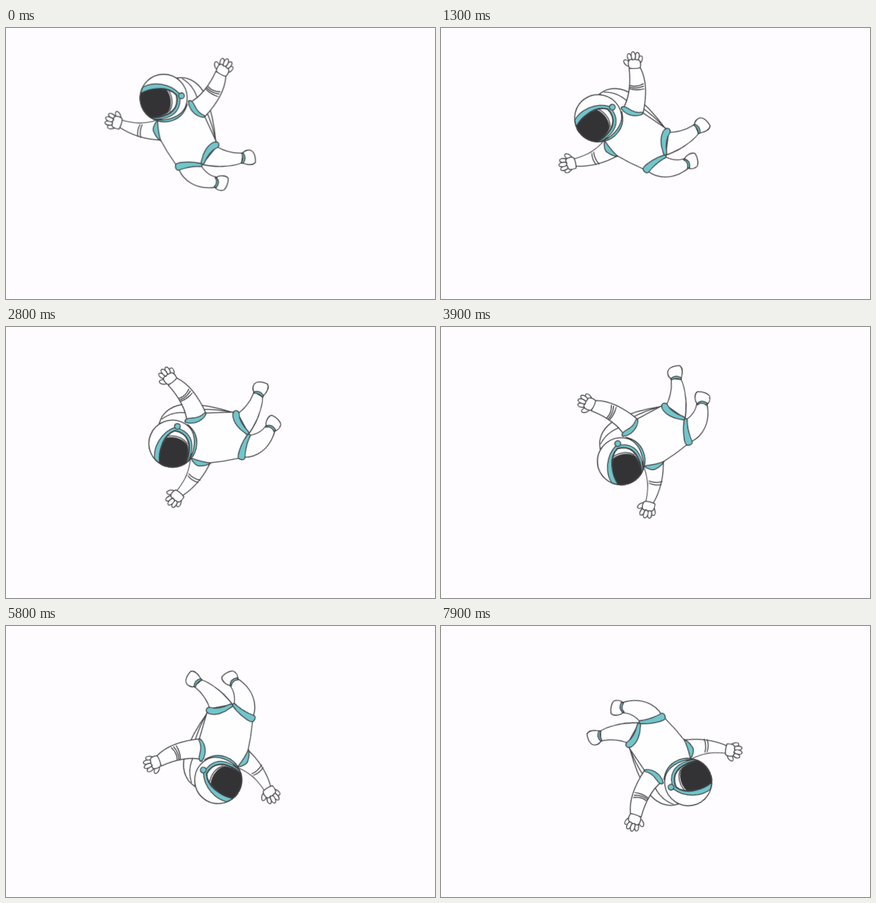
Recreate the animation shown at these times as an HTML page. Size 600 by 379 pixels, loop 8 s.

```html
<!DOCTYPE html>
<html lang="en">
<head>
<meta charset="utf-8">
<title>Drifting astronaut</title>
<style>
  html, body { margin: 0; width: 100%; height: 100%; overflow: hidden; background: #fefcff; }
  svg { display: block; width: 100%; height: 100%; }
  .astronaut {
    fill: #fefdff; stroke: #404042; stroke-width: 1.3;
    stroke-linejoin: round; stroke-linecap: round;
    transform-box: view-box;
    transform-origin: 246px 127.2px;
    animation: drift 8s steps(80) infinite;
  }
  .teal { fill: #70c6cc; }
  .dark { fill: #333335; }
  .line { fill: none; }
  .bare { stroke: none; }
  /* steady tumble plus straight drift, ten poses a second */
  @keyframes drift {
    from { transform: translate(.4px, .7px) rotate(0deg); }
    to { transform: translate(70px, 66.5px) rotate(-192deg); }
  }
</style>
</head>
<body>
<svg viewBox="0 0 600 379">
  <defs>
    <g id="hand">
      <ellipse cx="-10" cy="-7" rx="3.1" ry="5.8" transform="rotate(-46 -10 -7)"/>
      <ellipse cx="8" cy="-11" rx="3" ry="5.6" transform="rotate(24 8 -11)"/>
      <ellipse cx="-6" cy="-14.5" rx="3" ry="5.8" transform="rotate(-18 -6 -14.5)"/>
      <ellipse cx="4.2" cy="-15.5" rx="3" ry="6" transform="rotate(12 4.2 -15.5)"/>
      <ellipse cx="-1" cy="-16.5" rx="3" ry="6" transform="rotate(-3 -1 -16.5)"/>
      <path d="M-7 0 C-9 -3 -9 -8 -7 -11 Q-4 -13 -2 -11 Q1 -13 3 -11 Q6 -12 8 -9 C9 -6 9 -3 8 0 Q0 2 -7 0Z"/>
    </g>
  </defs>

  <g class="astronaut">
    <!-- backpack -->
    <path d="M239 69 C257 66 271 78 279 94 C286 112 291 136 293 158 L262 118Z"/>
    <path class="line" d="M246 70 C258 77 265 88 268 101 M280 116 Q289 136 293 158"/>

    <!-- far arm -->
    <path d="M160 127.500 C178 133 193 134 211 128 L216 156 C195 155 175 149 159 138.500Z"/>
    <path class="line" d="M187 134.500 Q182.500 142 184 151 M190 134.500 Q186 143 188 152.500"/>
    <use href="#hand" transform="translate(160 133) rotate(-72) scale(-1 1)"/>

    <!-- legs -->
    <path d="M241 196 C247 212 265 226 293 222 L296 208 C288 207 279 203 272 191Z"/>
    <path d="M294 208 C299 204 309 206 310.500 210 C310.500 217 307 224 304 226 C299 227.500 293 225.500 291 221 Q298 215 294 208Z"/>
    <path class="teal" d="M293.500 208 Q300 214 293.500 222.500 L291 221 Q296.500 214.500 292 208.500Z"/>
    <path d="M294 165 C306 172 319 175 331 174 L329 188 C314 194 290 194 274 190Z"/>
    <path d="M331 174 C333 170 340 169 343 171 C347 173 349 181 348.500 187 C346 190.500 340 190.500 337 190 C333 189 331 188.500 329 187.500 Q334 181 331 174Z"/>
    <path class="teal" d="M331 174 Q337 181 331 188.500 L328.500 188 Q333 181 329 174.500Z"/>

    <!-- torso and hips -->
    <path class="bare" d="M209 128 C209 145 216 157 225 172 L237 190 L273 191 L294 160 L277 122 L252 96Z"/>
    <path class="line" d="M214 153 Q217 158 225 172 L237 190 M277 122 L294 159"/>
    <path class="teal" d="M211.500 128.500 C206 134 204 141 206.500 145 C208.500 150 212 154.500 216 157 C213 148 212 138 211.500 128.500Z"/>
    <path class="teal" d="M236.500 192 C236 188.500 240 188 243 187.500 C253 186 263 186.500 271 188.500 C275 190 275 193 271 193 C262 192.500 251 194.500 241 198 C238 199 236.500 195 236.500 192Z"/>
    <path class="teal" d="M290 159 C297 157 299 162 296 166 C286 170 281 178 277 188 C274 192 271 189 273 185 C275 174 281 163 290 159Z"/>

    <!-- helmet -->
    <circle cx="220" cy="97" r="33"/>
    <path class="teal" d="M206 127 C222 135 246 130 253 106 C245 124 226 130 206 127Z"/>
    <path class="teal" d="M191 82 C205 74 228 76 242 91 C246 110 238 127 206 127 A33 33 0 0 1 191 82Z"/>
    <path stroke-width="2" d="M188 91 C202 83 226 80 238 93 C242 110 232 123.500 203 125 A33 33 0 0 1 188 91Z"/>
    <path class="dark" d="M188 91 C200 84 213 83 224 86 C231 96 231 108 226 117 C219 122 210 124 203 125 A33 33 0 0 1 188 91Z"/>
    <path class="line" d="M227 86.500 C233.500 97 233 108 228 116"/>
    <circle class="teal" cx="245" cy="94" r="4"/>

    <!-- near arm -->
    <path d="M257 103 C270 97 284 80 293 60 L307 67 C306 87 293 107 277 124 Q264 118 257 103Z"/>
    <path class="line" d="M282 81 Q288 88 299 88.500 M280.500 83 Q287 90 297.500 91.500 M279.500 85 Q286 92 296 95"/>
    <path class="teal" d="M254.500 102 C257 99 261 102 263 107 C266 114 270 119 277 121.500 C279 125 273 124.500 268 122 C260 118 255 110 254.500 102Z"/>
    <use href="#hand" transform="translate(300 63) rotate(29)"/>
  </g>
</svg>
</body>
</html>
```
